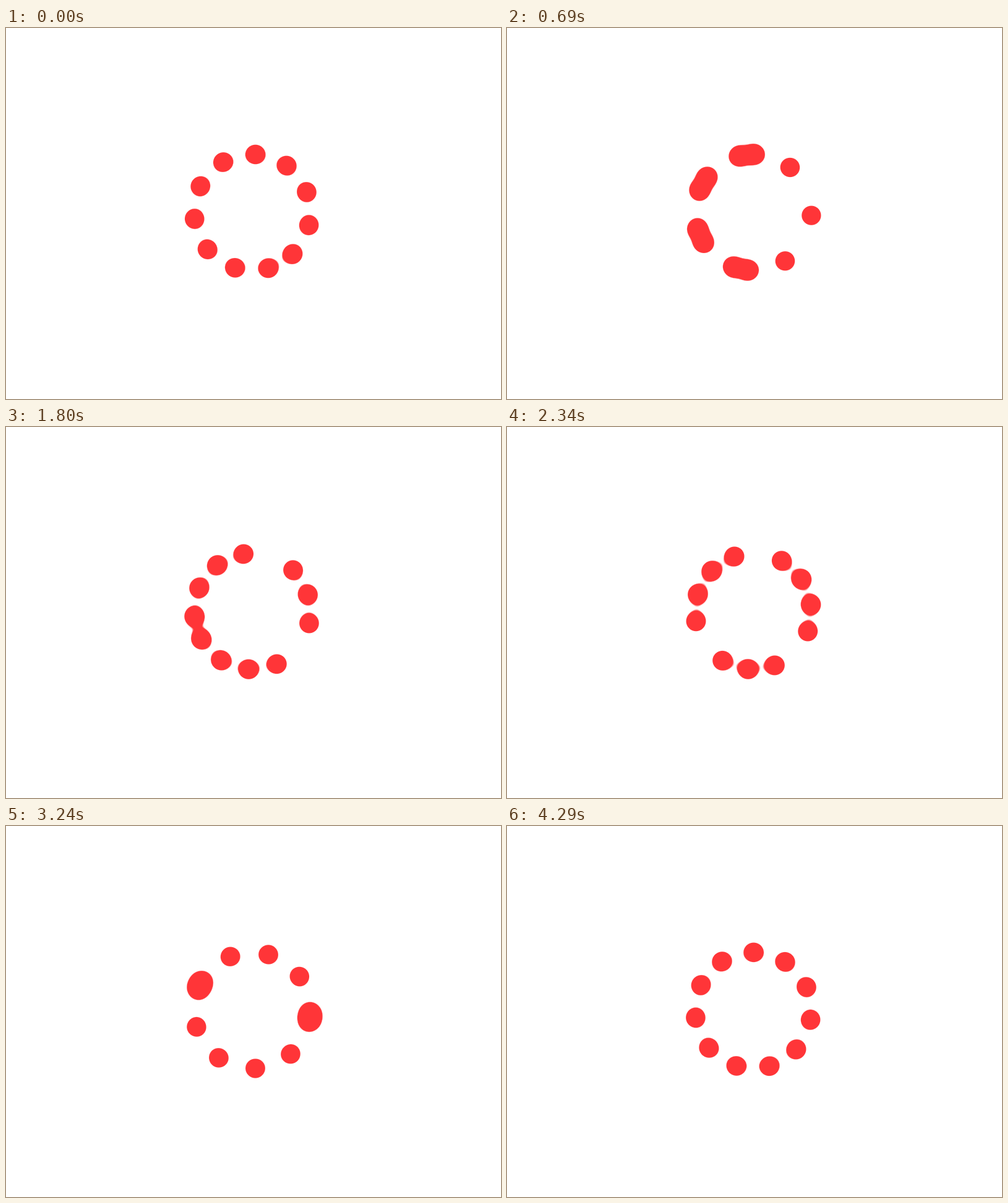
Write an HTML page with a canvas that moves like this. It is 800 px wide and 600 px high and loops after 4.32 s.

```html
<!DOCTYPE html>
<html lang="en">
<head>
<meta charset="utf-8">
<title>Metaball ring</title>
<style>
  html, body { margin: 0; width: 100%; height: 100%; overflow: hidden; background: #fff; }
  canvas { position: absolute; left: 268px; top: 168px; }
</style>
</head>
<body>
<canvas id="stage" width="260" height="260"></canvas>
<script>
const LOOP = 4320, STEP = 30, BALLS = 11, SIZE = 260;
const CX = 130, CY = 130.2, RING = 94;
const START = 130.9, GAP = 360 / BALLS;

// [time in ms, extra degrees between neighbouring balls]
const KEYS = [
  [0, 0.45], [690, 20.96], [1200, 49.76], [1800, 77.66],
  [2820, 112.15], [3240, 128.14], [4290, 163.76]
];

const slope = (a, b) => (KEYS[b][1] - KEYS[a][1]) / (KEYS[b][0] - KEYS[a][0]);
const tangents = KEYS.map((_, i) =>
  slope(Math.max(i - 1, 0), Math.min(i + 1, KEYS.length - 1)));

// Smooth cubic curve through the keys
function spread(t) {
  let i = 0;
  while (i < KEYS.length - 2 && t > KEYS[i + 1][0]) i++;
  const [t0, v0] = KEYS[i], [t1, v1] = KEYS[i + 1];
  const span = t1 - t0, u = Math.min((t - t0) / span, 1), w = 1 - u;
  return v0 * w * w * (1 + 2 * u) + v1 * u * u * (1 + 2 * w)
    + span * u * w * (tangents[i] * w - tangents[i + 1] * u);
}

const ctx = document.getElementById("stage").getContext("2d");
const image = ctx.createImageData(SIZE, SIZE);
const pixels = image.data;
for (let i = 0; i < pixels.length; i += 4) {
  pixels[i] = 255;
  pixels[i + 1] = 53;
  pixels[i + 2] = 56;
}

function draw(t) {
  const turn = GAP + spread(t);
  const balls = Array.from({ length: BALLS }, (_, i) => {
    const a = (START + (i + 1) * turn) * Math.PI / 180;
    return [CX + RING * Math.sin(a), CY - RING * Math.cos(a)];
  });
  let p = 3;
  for (let y = 0.5; y < SIZE; y++) {
    for (let x = 0.5; x < SIZE; x++, p += 4) {
      let field = 0;
      for (const [bx, by] of balls) {
        const dx = x - bx, dy = y - by;
        field += Math.max(0, 262.7 / (dx * dx + dy * dy + 0.01) - 0.0794);
      }
      // The field falls about 1/7 per pixel at the edge
      pixels[p] = 255 * ((field - 1) * 7 + 0.5);
    }
  }
  ctx.putImageData(image, 0, 0);
}

const begin = performance.now();
let shown = -1;
function tick() {
  const elapsed = (performance.now() - begin) % LOOP;
  const t = Math.floor(elapsed / STEP) * STEP;
  if (t !== shown) draw(shown = t);
  requestAnimationFrame(tick);
}
tick();
</script>
</body>
</html>
```
